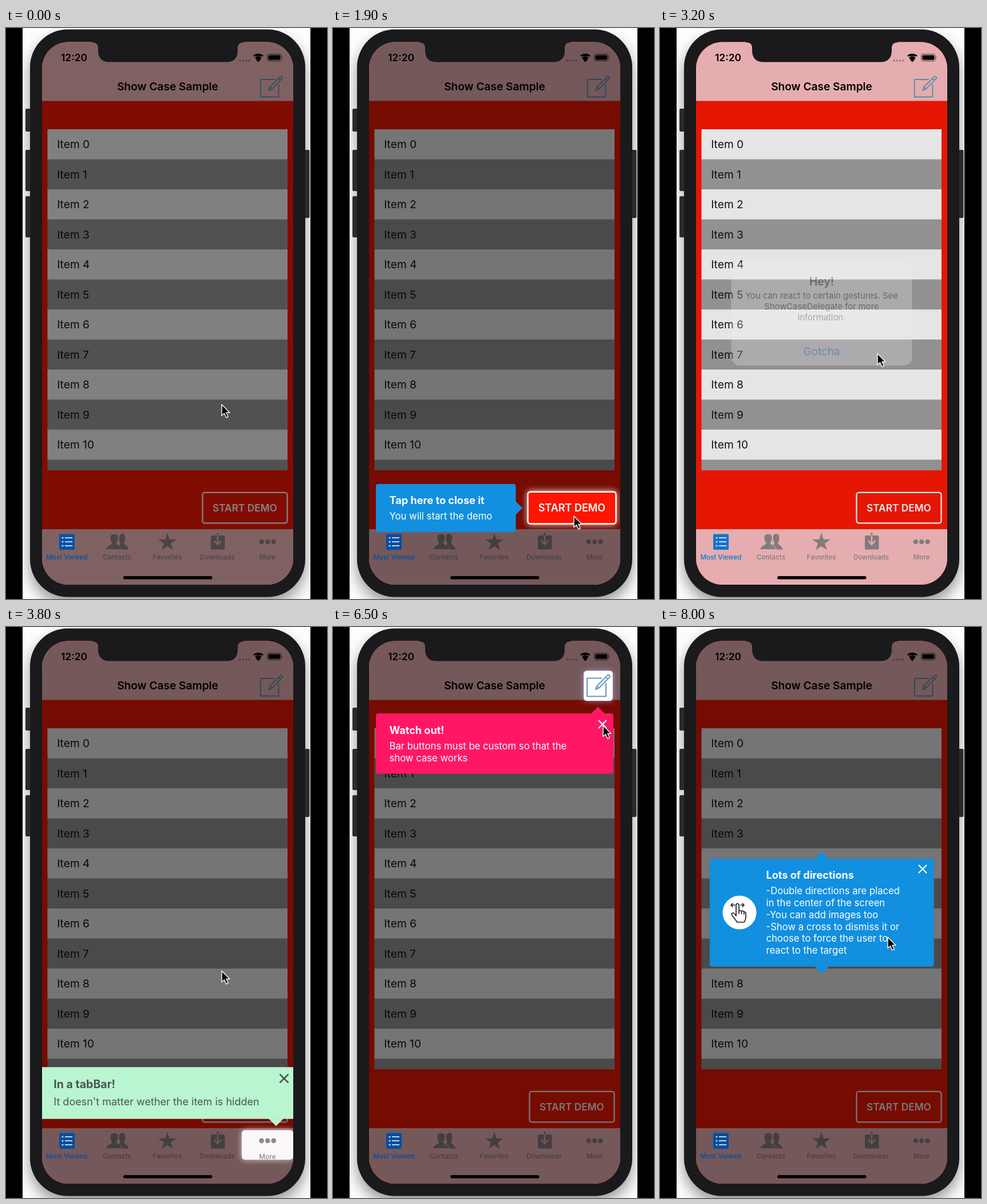
Animation, 561 px wide and 998 px high, one loop 8100 ms. Source, as an HTML page:

```html
<!DOCTYPE html>
<html lang="en">
<head>
<meta charset="utf-8">
<title>Show Case Sample</title>
<style>
html, body { margin: 0; width: 100%; height: 100%; overflow: hidden; background: #000; }
svg { display: block; width: 100vw; height: 100vh; font-family: Inter, Roboto, sans-serif; }
.mid { text-anchor: middle; }
.row { font-size: 19.2px; fill: #111; }
.head { font-size: 18.1px; font-weight: 700; }
.body { font-size: 16.7px; }
.tab { font-size: 11.6px; font-weight: 500; text-anchor: middle; }
.btn { font-size: 17.3px; font-weight: 600; text-anchor: middle; fill: #fff; }
</style>
</head>
<body>
<svg id="stage" viewBox="0 0 561 998" xmlns="http://www.w3.org/2000/svg"></svg>
<script>
const LOOP = 8100, STEP = 100, DIM = 0.53;
const GRAY = '#8f8688', PINK = '#f9bcbf';

const rect = (x, y, w, h, fill, r = 0, more = '') =>
  `<rect x="${x}" y="${y}" width="${w}" height="${h}" rx="${r}" fill="${fill}" ${more}/>`;
const text = (x, y, s, cls, more = '') => `<text x="${x}" y="${y}" class="${cls}" ${more}>${s}</text>`;
const lines = (x, y, gap, list, cls) => list.map((s, i) => text(x, y + i * gap, s, cls)).join('');
const range = (n, f) => Array.from({ length: n }, (_, i) => f(i)).join('');

// Interface pieces
const rows = range(12, i => {
  const y = 177 + i * 52.5;
  return rect(72.5, y, 419.5, 53, i % 2 ? '#9f9d9f' : '#faf9fb') +
    (i < 11 ? text(89.2, y + 33.2, 'Item ' + i, 'row') : '');
});

const statusBar = `
  ${text(96, 58, '12:20', '', 'font-size="17.4" font-weight="600"')}
  ${range(4, i => `<circle cx="${409 + i * 5.3}" cy="57" r="1.7" fill="#a57f82"/>`)}
  <path d="M441 58l-3-3.4a4.4 4.4 0 0 1 6 0zM435.800 52.600a7.600 7.600 0 0 1 10.400 0M432.800 49.200a12 12 0 0 1 16.400 0"
    stroke="#000" stroke-width="2.3"/>
  ${rect(456.6, 45.6, 24.6, 12, 'none', 3.6, 'stroke="#6d5255" stroke-width="1.2"')}
  ${rect(458.4, 47.4, 21, 8.400, '#000', 2)}
  <path d="M482.600 49.500q2 2 0 4z" fill="#6d5255"/>`;

const editIcon = `<g fill="none" stroke="#5f9cbd" stroke-width="1.9" stroke-linejoin="round">
  <path d="M470 90H444.800V120.500H476.500V98"/>
  <path d="M459 109l2.300-6L479 85.300q2-1.600 3.400 0t0 3.400L464.800 106.600zM461.300 103l3.500 3.600M476.300 88l3.500 3.500"/></g>`;

const button = fill => rect(343.5, 811.8, 148, 53.600, fill, 4, 'stroke="#fff" stroke-width="2.3"') +
  text(417.5, 845, 'START DEMO', 'btn');

const moreTab = `<g fill="${GRAY}">${range(3, i => `<circle cx="${446.8 + i * 10.4}" cy="898" r="4.200"/>`)}
  ${text(457, 929.3, 'More', 'tab')}</g>`;

const person = (x, s) => `<path transform="translate(${x} 0) scale(${s} 1)"
  d="M0 884c5 0 7.500 3.500 7 8.500-.3 4-2 5.500-3 7.500 0 4 9 4 10.500 11.500H-14.500C-13 904-4 904-4 900c-1-2-2.700-3.500-3-7.500-.5-5 2-8.500 7-8.500z"/>`;
const star = range(10, i => {
  const a = i * Math.PI / 5, r = i % 2 ? 6.400 : 16.8;
  return `${282 + r * Math.sin(a)},${899 - r * Math.cos(a)} `;
});

const tabs = `<g fill="${GRAY}">
  ${person(203, 0.78)}<g stroke="${PINK}" stroke-width="1">${person(189, 1)}</g>
  <polygon points="${star}"/>
  ${rect(358, 887, 24.500, 24.500, GRAY, 2)}
  <path d="M370 882v20m-6-6l6 7 6-7" fill="none" stroke="${PINK}" stroke-width="2.400"/>
  <path d="M370 882v5" stroke="${GRAY}" stroke-width="2.400"/>
  ${text(194, 929.3, 'Contacts', 'tab')}${text(282, 929.3, 'Favorites', 'tab')}${text(369, 929.3, 'Downloads', 'tab')}
  </g>${moreTab}${rect(205, 958, 155.500, 5.500, '#000', 2.700)}`;

const activeTab = `<g id="active">${rect(93, 884.500, 27, 27.500, 'currentColor', 2)}
  ${range(3, i => `<circle cx="99" cy="${891 + i * 7}" r="1.600" fill="#fff" opacity=".75"/>` +
    rect(103, 890 + i * 7, 13, 2, '#fff', 0, 'opacity=".75"'))}
  ${text(106.5, 929.3, 'Most Viewed', 'tab', 'fill="currentColor"')}</g>`;

const cross = (x, y, color) =>
  `<path d="M${x - 7} ${y - 7}l14 14m0-14l-14 14" stroke="${color}" stroke-width="2.300"/>`;

const hand = `<circle cx="139" cy="499" r="29.500" fill="#fff"/>
  <g fill="none" stroke="#222" stroke-width="1.700" stroke-linecap="round" stroke-linejoin="round">
  <path d="M124 486h7m-4-3l-3 3 3 3M141 486h6m-3-3l3 3-3 3"/>
  <path d="M133 505V486q0-2.500 2.500-2.500t2.500 2.500V497q2-3 4.500 0 2.500-2 4.300 1 3.200-1 3.200 3V507q0 5-3 9H135l-9-12q-2-4 1.500-4.500 2 0 5.500 5.500M138 497v4M142.500 497v4M146.800 498v4"/></g>`;

// Guided steps: dim in/out, highlight, callout
const steps = [
  { dim: [-250, 22, 2050, 2300], spot: 'spotBtn', lit: 400, pop: 550, cx: 197, cy: 839,
    art: `<g fill="#fff">${rect(75, 797, 244.5, 84, '#128fdf', 4)}
      <path d="M319 827l12 12-12 12z" fill="#128fdf"/>
      ${text(98.5, 832, 'Tap here to close it', 'head')}${text(98.5, 859.5, 'You will start the demo', 'body')}</g>` },
  { dim: [3300, 3550, 4750, 4950], spot: 'spotMore', lit: 3550, pop: 3560, cx: 282.5, cy: 814.5,
    art: `<g fill="#4b5650">${rect(75, 772.5, 415, 84, '#b9f5d0', 4)}
      <path d="M446 856h24l-12 12z" fill="#b9f5d0"/>
      ${text(98, 807, 'In a tabBar!', 'head')}${text(98, 834.5, 'It doesn\'t matter wether the item is hidden', 'body')}
      ${cross(471, 791, '#434d48')}</g>` },
  { dim: [5000, 5200, 6620, 6850], spot: 'spotEdit', lit: 5080, pop: 5300, cx: 282.5, cy: 203.5,
    art: `<g fill="#fff">${rect(75, 151, 415, 105.5, '#ff1764', 4)}
      <path d="M451 151.500h24l-12-12z" fill="#ff1764"/>
      ${text(98.5, 187, 'Watch out!', 'head')}
      ${lines(98.5, 214.5, 20.7, ['Bar buttons must be custom so that the', 'show case works'], 'body')}
      ${cross(471, 170, '#fff')}</g>` },
  { dim: [6950, 7200, 9000, 9100], pop: 7250, cx: 282.5, cy: 499,
    art: `<g fill="#fff">${rect(87, 405, 391.5, 188.5, '#128fdf', 4)}
      <path d="M270 405.500h25l-12.500-12.500zM270 593h25l-12.500 12.500z" fill="#128fdf"/>
      ${hand}${text(185.5, 440, 'Lots of directions', 'head')}
      ${lines(185.5, 467, 20.85, ['-Double directions are placed', 'in the center of the screen', '-You can add images too',
        '-Show a cross to dismiss it or', 'choose to force the user to', 'react to the target'], 'body')}
      ${cross(459, 423, '#fff')}</g>` }
];

const glow = (x, y, w, h, color) => rect(x, y, w, h, color, 5, 'filter="url(#soft)" opacity=".75"');
const spots = `
  <g id="spotBtn">${glow(342, 810, 151, 57, '#fff')}${button('#ff1500')}</g>
  <g id="spotMore">${glow(413, 880, 88, 50.5, '#fff')}${rect(413, 880, 88, 50.5, '#fbf8fb', 5)}${moreTab}</g>
  <g id="spotEdit">${glow(439, 77.5, 49, 50.5, '#aca4e8')}${rect(439, 77.5, 49, 50.5, '#fff', 5)}${editIcon}</g>`;
const spotCenter = { spotBtn: [417.5, 838.6], spotMore: [457, 905.2], spotEdit: [463.5, 102.7] };

const alertBox = `<g id="alert" opacity="0">${rect(124.5, 409, 316, 181, '#f4f2f3', 15, 'fill-opacity=".96"')}
  ${rect(124.5, 539.5, 316, 1, '#c9c7ca')}
  ${text(282.5, 450, 'Hey!', 'mid', 'font-size="19.400" font-weight="600"')}
  <g font-size="14.800">${lines(282.5, 473.2, 18.7, ['You can react to certain gestures. See',
    'ShowCaseDelegate for more', 'information.'], 'mid')}</g>
  ${text(282.5, 572, 'Gotcha', 'mid', 'font-size="19" fill="#0a7cf0"')}</g>`;

const stage = document.getElementById('stage');
stage.innerHTML = `
  <defs>
    <clipPath id="page">${rect(29, 0, 503, 998, '#fff')}</clipPath>
    <clipPath id="screen">${rect(63, 24.5, 439, 948.5, '#fff', 46)}</clipPath>
    <filter id="soft" x="-50%" y="-50%" width="200%" height="200%"><feGaussianBlur stdDeviation="5"/></filter>
    <filter id="shade" x="-20%" y="-20%" width="140%" height="140%"><feGaussianBlur stdDeviation="13"/></filter>
  </defs>
  ${rect(0, 0, 561, 998, '#000')}
  <g clip-path="url(#page)">${rect(29, 0, 503, 998, '#fdfdfd')}
    ${rect(42, 16, 481, 990, '#000', 66, 'filter="url(#shade)" opacity=".42"')}</g>
  ${[[34, 141, 40], [34, 213, 72], [34, 294, 72], [519, 213, 119]].map(([x, y, h]) => rect(x, y, 11.5, h, '#2b2a2c', 2)).join('')}
  ${rect(42, 2.5, 481, 992, '#1a191c', 66)}
  <g clip-path="url(#screen)">
    ${rect(63, 24, 439, 950, '#fb1804')}${rect(63, 24, 439, 103.5, PINK)}
    ${statusBar}${text(282.5, 109, 'Show Case Sample', 'mid', 'font-size="19.100" font-weight="600"')}${editIcon}
    <svg x="0" y="0" width="561" height="773">${rows}</svg>
    ${button('none')}${rect(63, 876, 439, 98, PINK)}${tabs}
    <rect id="dim" x="63" y="24" width="439" height="950"/>
    ${activeTab}${spots}
    ${steps.map((s, i) => `<g id="tip${i}">${s.art}</g>`).join('')}
    ${alertBox}
  </g>
  <path d="M150 23h266v2q-11 0-11 10v4q0 20.500-20 20.500H181q-20 0-20-20.500v-4q0-10-11-10z" fill="#1a191c"/>
  <path id="cursor" d="M0 0V19.500l4.500-4 3.300 7.500 3.500-1.500-3.300-7.300h6z" fill="#0a0a0a" stroke="#f4f0f0"
    stroke-width="1.500" stroke-linejoin="round"/>`;

// Motion
const el = id => document.getElementById(id);
const ramp = (t, a, b) => Math.min(1, Math.max(0, (t - a) / (b - a)));
const ease = u => u * u * (3 - 2 * u);
const hold = (t, [a, b, c, d]) => ramp(t, a, b) * (1 - ramp(t, c, d));
const spring = u => 1 - Math.exp(-10 * u) * Math.cos(11 * u);

const path = [[0, 377, 658], [500, 377, 658], [1400, 418, 845], [1900, 421, 853], [2100, 421, 853],
  [2800, 380, 569], [3250, 380, 569], [3600, 377, 601], [3900, 377, 601], [4500, 471, 788],
  [4900, 490, 793], [5200, 475, 787], [5450, 475, 787], [6300, 472, 172], [6700, 472, 172],
  [7600, 400, 535], [8000, 398, 542], [8100, 398, 542]];

function cursorAt(t) {
  const i = path.findIndex(p => p[0] > t);
  const [t0, x0, y0] = path[i - 1], [t1, x1, y1] = path[i];
  const u = ease(ramp(t, t0, t1));
  return [x0 + (x1 - x0) * u, y0 + (y1 - y0) * u];
}

function place(node, x, y, scale, alpha) {
  node.setAttribute('transform', `translate(${x} ${y}) scale(${scale}) translate(${-x} ${-y})`);
  node.setAttribute('opacity', alpha);
}

function draw(t) {
  let shade = 0;
  steps.forEach((s, i) => {
    const [, , end, gone] = s.dim, out = 1 - ramp(t, end, gone);
    shade = Math.max(shade, DIM * hold(t, s.dim));
    if (s.spot) {
      const beat = 1 + 0.02 * (1 - Math.cos((t - s.lit) * Math.PI / 500));
      place(el(s.spot), ...spotCenter[s.spot], beat, ramp(t, s.lit, s.lit + 100) * out);
    }
    const u = Math.max(0, t - s.pop) / 1000;
    place(el('tip' + i), s.cx, s.cy, spring(u), u > 0 ? ramp(u, 0, 0.1) * out : 0);
  });

  const open = hold(t, [2300, 2550, 3030, 3265]);
  place(el('alert'), 282.5, 499.5, 1.2 - 0.2 * ease(ramp(t, 2300, 2600)), open);
  shade = Math.max(shade, 0.3 * open);
  el('dim').setAttribute('opacity', shade);

  const k = shade / DIM;
  el('active').setAttribute('color', `rgb(${24 - 20 * k},${122 - 44 * k},${205 - 45 * k})`);
  el('cursor').setAttribute('transform', `translate(${cursorAt(t)})`);
}

function tick() {
  draw(Math.floor(performance.now() % LOOP / STEP) * STEP);
  requestAnimationFrame(tick);
}
tick();
</script>
</body>
</html>
```
